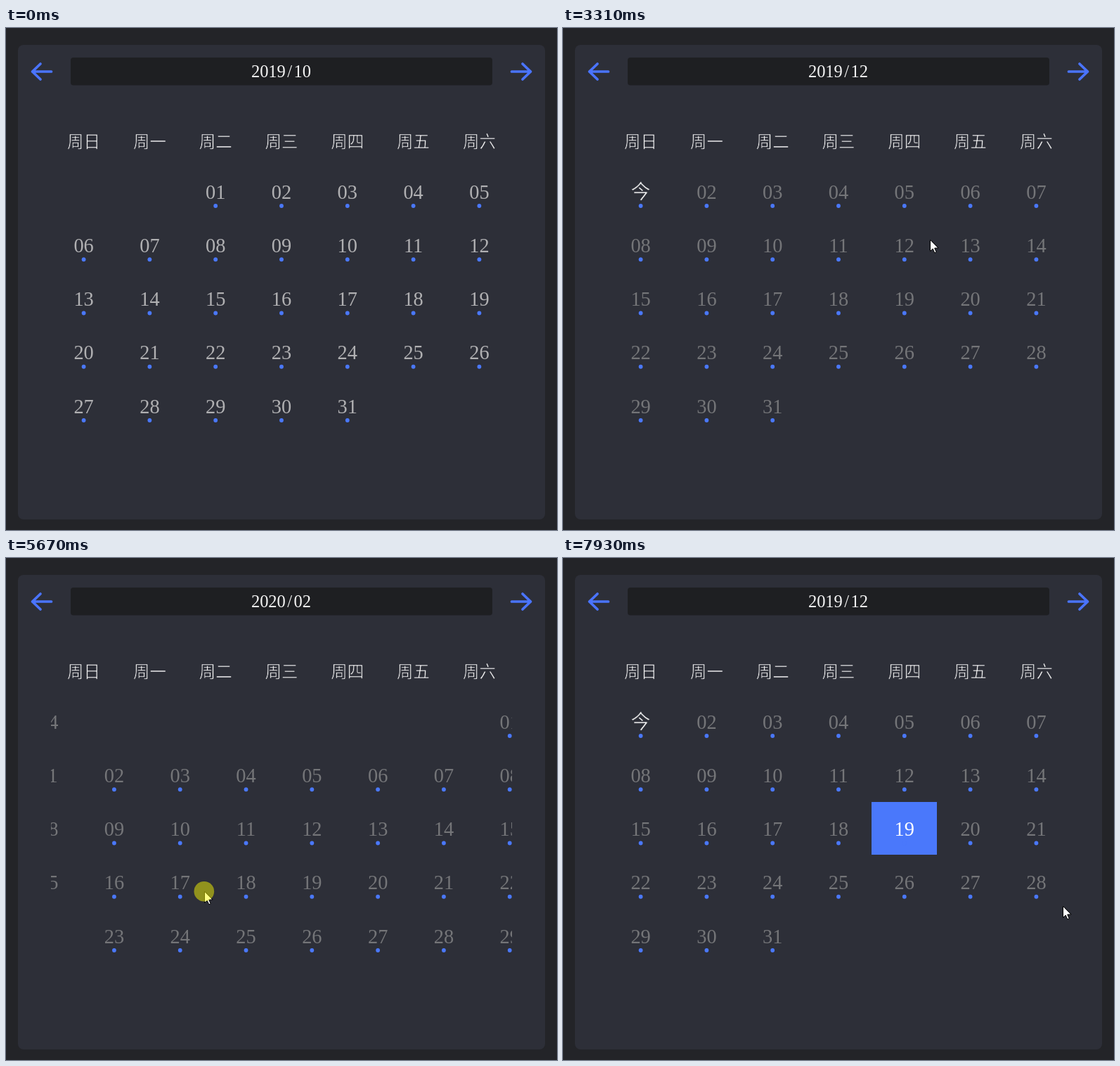
Write an HTML page with a canvas that moves like this. It is 784x714 px and loops after 8 s.

```html
<!DOCTYPE html>
<html lang="zh">
<head>
<meta charset="utf-8">
<title>Calendar</title>
<style>
html, body { margin: 0; width: 100%; height: 100%; overflow: hidden; background: #232428; }
canvas { display: block; }
</style>
</head>
<body>
<canvas id="stage" width="784" height="714"></canvas>
<script>
const ctx = document.getElementById('stage').getContext('2d');
const LOOP = 8000, STEP = 78.7;
const SLIDE_MS = 300, SNAP_MS = 240;
const COL = 93.8, ROW = 76.25, LEFT = 110.6, PAGE = COL * 7;
const PANEL = '#2d2f38', BLUE = '#4a78fb', WHITE = '#f4f4f4';
const SERIF = '"Liberation Serif", "Noto Serif", serif';
const CJK = '"Noto Sans CJK SC", "Noto Sans CJK", "Noto Sans CJK JP", sans-serif';

// Pointer stops: time, x, y and an action; an action holds the button until the next stop
const STOPS = [
  [70, 700, 685], [280, 663, 225], [430, 661, 214], [740, 720, 61],
  [1020, 717, 70, 'next'], [1065, 717, 70], [1530, 717, 70],
  [1770, 722, 73, 'next'], [1880, 722, 73], [2046, 698, 136], [2540, 682, 136],
  [3305, 522, 301], [3630, 560, 340, 'swipe'], [4080, 35, 440], [4486, 398, 479],
  [4700, 625, 476, 'swipe'], [5120, 130, 475], [5632, 239, 474, 'swipe'], [5990, 690, 476],
  [6380, 184.5, 478, 'swipe'], [6689, 681, 472], [7470, 488, 385],
  [7620, 488, 385, 'pick'], [7690, 490, 385], [7860, 711, 495]
].map(([t, x, y, act]) => ({ t, x, y, act }));

const HOLDS = STOPS.flatMap((s, i) => s.act ? [{ act: s.act, down: s, up: STOPS[i + 1] }] : []);

const clamp = u => Math.max(0, Math.min(1, u));
const easeInOut = u => u < 0.5 ? 2 * u * u : 1 - 2 * (1 - u) * (1 - u);
const easeOut = u => 1 - (1 - u) * (1 - u);

function pointer(t) {
  const next = STOPS.findIndex((s, i) => i > 0 && s.t > t);
  const b = next < 0 ? STOPS[STOPS.length - 1] : STOPS[next];
  const a = STOPS[STOPS.indexOf(b) - 1];
  const u = clamp((t - a.t) / (b.t - a.t));
  return { x: a.x + (b.x - a.x) * u, y: a.y + (b.y - a.y) * u };
}

// Page position in months, the month in the title, and whether a day is chosen
function calendar(t) {
  let pos = 0, month = 0, picked = false;
  for (const { act, down, up } of HOLDS) {
    if (t < down.t) break;
    const from = month, after = t - up.t;
    if (act === 'pick') picked = after >= 0;
    if (act === 'next' && after >= 0) {
      month++;
      pos = from + easeInOut(clamp(after / SLIDE_MS));
    }
    if (act === 'swipe') {
      const dragged = from + (down.x - pointer(Math.min(t, up.t)).x) / PAGE;
      const goal = from + Math.sign(down.x - up.x);
      pos = dragged + (goal - dragged) * easeOut(clamp(after / SNAP_MS));
      if (after >= SNAP_MS) month = goal;
    }
  }
  return { pos, month, picked };
}

function box(x, y, w, h, r, fill) {
  ctx.fillStyle = fill;
  ctx.beginPath();
  ctx.roundRect(x, y, w, h, r);
  ctx.fill();
}

function disc(x, y, r, fill) {
  ctx.fillStyle = fill;
  ctx.beginPath();
  ctx.arc(x, y, r, 0, Math.PI * 2);
  ctx.fill();
}

function label(text, x, y, size, fill) {
  ctx.font = `${size}px ${SERIF}`;
  ctx.fillStyle = fill;
  ctx.fillText(text, x, y);
}

// Han characters, thinned by trimming their edges
function han(text, x, y, size) {
  ctx.font = `300 ${size}px ${CJK}`;
  ctx.fillStyle = WHITE;
  ctx.fillText(text, x, y);
  ctx.strokeStyle = PANEL;
  ctx.lineWidth = 0.6;
  ctx.strokeText(text, x, y);
}

function arrow(tip, dir) {
  ctx.strokeStyle = '#4a74ff';
  ctx.lineWidth = 3.7;
  ctx.lineCap = ctx.lineJoin = 'round';
  ctx.beginPath();
  ctx.moveTo(tip, 62);
  ctx.lineTo(tip + 27 * dir, 62);
  ctx.moveTo(tip + 11.5 * dir, 51);
  ctx.lineTo(tip, 62);
  ctx.lineTo(tip + 11.5 * dir, 73);
  ctx.stroke();
}

const twoDigits = n => String(n).padStart(2, '0');

function drawTitle(month) {
  const d = new Date(2019, 9 + month, 1);
  const text = d.getFullYear() + '/' + twoDigits(d.getMonth() + 1);
  [...text].forEach((c, i) => label(c, 391.5 + (i - 3) * 12.1, 69.8, 24.5, WHITE));
}

function drawMonth(m, dx, picked) {
  const first = new Date(2019, 9 + m, 1).getDay();
  const count = new Date(2019, 10 + m, 0).getDate();
  for (let d = 1; d <= count; d++) {
    const cell = first + d - 1;
    const x = LEFT + (cell % 7) * COL + dx;
    const y = 233 + Math.floor(cell / 7) * ROW;
    const chosen = picked && m === 2 && d === 19;
    if (chosen) box(Math.round(x - 46.8), Math.round(y - 38.3), 93, 75, 0, BLUE);
    if (m === 2 && d === 1) han('今', x, y + 10.4, 28);
    else label(twoDigits(d), x, y + 9.7, 28.4, chosen ? '#fff' : m < 2 ? '#b0b0b2' : '#747578');
    disc(x, y + 20, 2.9, BLUE);
  }
}

function drawPointer(t) {
  if (t < STOPS[0].t) return;
  const { x, y } = pointer(t);
  ctx.save();
  ctx.translate(Math.round(x) + 0.5, Math.round(y) + 0.5);
  ctx.beginPath();
  [[0, 0], [0, 16], [3.7, 12.5], [6.3, 18.3], [8.7, 17.2], [6.2, 11.6], [11.2, 11.4]]
    .forEach(p => ctx.lineTo(...p));
  ctx.closePath();
  ctx.fillStyle = '#fff';
  ctx.strokeStyle = '#000';
  ctx.lineWidth = 1;
  ctx.lineJoin = 'miter';
  ctx.fill();
  ctx.stroke();
  ctx.restore();
  if (HOLDS.some(h => t >= h.down.t && t < h.up.t)) {
    disc(x - 0.5, y, 14.3, 'rgba(255,255,0,0.48)');
  }
}

function draw(t) {
  const { pos, month, picked } = calendar(t);
  ctx.textAlign = 'center';
  box(0, 0, 784, 714, 0, '#232428');
  box(17, 24, 750, 675, 8, PANEL);
  box(92, 42, 600, 39.5, 4, '#1e1f22');
  arrow(37.5, 1);
  arrow(746.5, -1);
  drawTitle(month);
  [...'日一二三四五六'].forEach((c, i) => han('周' + c, LEFT + i * COL, 169.6, 23.5));

  ctx.save();
  ctx.beginPath();
  ctx.rect(64, 190, 656, 460);
  ctx.clip();
  for (let m = Math.floor(pos); m <= Math.ceil(pos); m++) {
    drawMonth(m, (m - pos) * PAGE, picked);
  }
  ctx.restore();
  drawPointer(t);
}

function tick() {
  const t = performance.now() % LOOP;
  draw(Math.floor(t / STEP) * STEP);
  requestAnimationFrame(tick);
}
tick();
</script>
</body>
</html>
```
